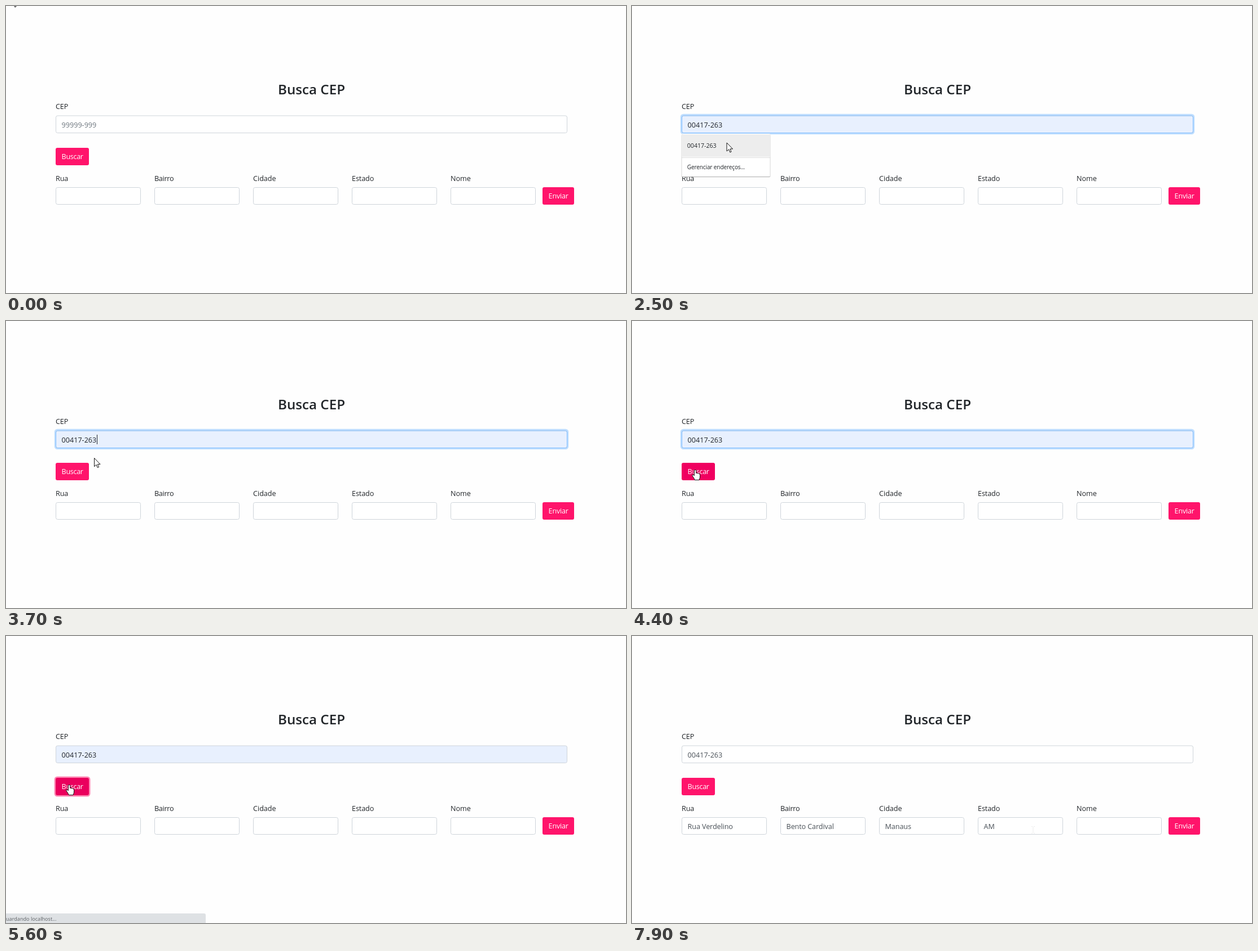
Animation of 1099x510 px, one loop 8000 ms. Source, as an HTML page:

```html
<!DOCTYPE html>
<html lang="pt-BR">
<head>
<meta charset="utf-8">
<title>Busca CEP</title>
<style>
html, body { margin: 0; width: 100%; height: 100%; overflow: hidden; background: #fefefe; }
svg { display: block; width: 100%; height: 100%; }
text { font-family: "Open Sans", "Noto Sans", sans-serif; font-size: 12.6px; fill: #212529; white-space: pre; }
.field { fill: #fff; stroke: #ced4da; }
.value { fill: #495057; }
.onBtn { fill: #fff; }
</style>
</head>
<body>
<svg id="stage" viewBox="0 0 1099 510" xmlns="http://www.w3.org/2000/svg"></svg>
<script>
const LOOP = 8000;
const CEP = "00417-263";
const PINK = "#ff146b", PINK_HOVER = "#f00060", PINK_ACTIVE = "#ea005d";
const stage = document.getElementById("stage");

function add(tag, attrs, parent = stage) {
  const node = document.createElementNS("http://www.w3.org/2000/svg", tag);
  for (const key in attrs) node.setAttribute(key, attrs[key]);
  parent.appendChild(node);
  return node;
}
function label(str, x, y, attrs = {}, parent = stage) {
  const node = add("text", { x, y, ...attrs }, parent);
  node.textContent = str;
  return node;
}
const box = (x, y, width, height, attrs, parent) =>
  add("rect", { x, y, width, height, rx: 3, ...attrs }, parent);
const spacing = v => ({ "letter-spacing": v });
const sized = px => "font-size:" + px + "px;";
const show = (node, on) => node.setAttribute("opacity", Number(on));
const clamp = v => Math.max(0, Math.min(1, v));
const mix = (a, b, p) => a + (b - a) * p;
const smooth = p => p * p * (3 - 2 * p);

// Heading and search field
label("Busca CEP", 541.5, 156.5, { "text-anchor": "middle", style: sized(24.2) + "font-weight:600" });
label("CEP", 88, 183, spacing(-0.1));
const focusRing = box(87.2, 193.2, 908.6, 33.6, { fill: "none", stroke: "#bfdeff", "stroke-width": 3, rx: 4 });
const cepField = box(88.5, 195, 906, 30.5, { class: "field" });
const focusLine = box(88.5, 195, 906, 30.5, { fill: "none", stroke: "#80bdff" });
const cepText = label(CEP, 98.6, 215.6);
const caret = add("rect", { y: 202, width: 1, height: 17, fill: "#212529" });

// Search button
const btnRing = box(87, 251, 61, 33, { fill: "none", stroke: "#ff8ab5", "stroke-width": 3, rx: 4 });
const searchBtn = box(88, 252, 59, 31, {});
label("Buscar", 98.6, 272, { class: "onBtn", ...spacing(-0.33) });

// Address row
const columns = [
  ["Rua", -0.1, "Rua Verdelino"],
  ["Bairro", -0.3, "Bento Cardival"],
  ["Cidade", 0, "Manaus"],
  ["Estado", -0.1, "AM"],
  ["Nome", 0, ""]
];
const results = columns.map(([name, gap, value], i) => {
  const x = 88 + i * 175;
  label(name, x, 310.8, spacing(gap));
  box(x + 0.5, 322.5, 150, 30, { class: "field" });
  return label(value, x + 10.6, 343, { class: "value", ...spacing(-0.1) });
});
box(951, 322, 56, 31, { fill: PINK });
label("Enviar", 961.6, 342.2, { class: "onBtn", ...spacing(-0.22) });

// Autofill list
const popup = add("g", {});
box(87, 228, 159, 76.5, { fill: "#000", opacity: 0.08 }, popup);
box(88, 229, 157, 75, { fill: "#b4b4b4", rx: 2 }, popup);
box(88, 227, 157, 76, { fill: "#fff", rx: 2 }, popup);
add("path", { d: "M88.5 227V302M244.5 227V302", stroke: "#ebebeb" }, popup);
const hoverRow = add("rect", { x: 88, y: 228, width: 157, height: 40, fill: "#ededed" }, popup);
add("path", { d: "M88 269.5H245", stroke: "#dcdcdc" }, popup);
label(CEP, 97.8, 251.6, { style: sized(10.6) + "font-weight:500" }, popup);
label("Gerenciar endereços...", 97.8, 290, { style: sized(10), ...spacing(-0.1) }, popup);

// Browser status bar
const status = add("g", {});
add("path", { d: "M0 493H351Q354 493 354 496V510H0Z", fill: "#dee1e4" }, status);
label("uardando localhost...", 0, 506, { style: sized(9.15) + "fill:#5c6064" }, status);

// Pointers
const outline = { fill: "#fff", stroke: "#111", "stroke-linejoin": "round" };
const beam = add("path", { d: "M708 338.5H710M712 338.5H714M708 350.5H710M712 350.5H714M711 339V350", stroke: "#ececec", fill: "none" });
const arrow = add("path", { d: "M0 0V15L3.5 11.8 5.8 17 8 16 5.8 11H10.5Z", ...outline });
const hand = add("path", {
  d: "M-1.7 1.5Q0-.8 1.7 1.5V6.5Q3.2 5 4.2 6.8 6 5.8 6.7 7.6 8.6 7.2 8.6 9.5V13Q8.6 15 7 18.5H-.8Q-1.5 16-4.6 11.8-6 9.6-4.4 9-3 8.6-1.7 10.8Z",
  ...outline
});

const inside = ([x, y], l, t, r, b) => x >= l && x <= r && y >= t && y <= b;

function pointerAt(t) {
  if (t < 3700) {
    if (t >= 800) return [168, 243];
    const p = clamp((t - 200) / 500);
    return [mix(10, 177, p), mix(-15, 168, p)];
  }
  if (t < 7000) {
    const p = smooth(clamp((t - 3600) / 800)), q = 1 - p;
    const bend = (a, b, c) => q * q * a + 2 * q * p * b + p * p * c;
    return [bend(168, 30, 112), bend(243, 250, 264)];
  }
  const p = smooth(clamp((t - 6900) / 900));
  return [mix(112, 607, p), mix(264, 343, p)];
}

function render(ms) {
  const t = Math.floor(ms % LOOP / 100) * 100;
  const during = (a, b) => t >= a && t < b;
  const preview = during(2300, 3000) || during(3200, 3700);
  const filled = during(3700, 6600);
  const loaded = t >= 6600;

  const focus = clamp((t - 1600) / 100) * clamp((4700 - t) / 200);
  show(focusRing, focus);
  show(focusLine, focus);
  cepField.style.fill = preview || filled ? "#e8f0fe" : "#fff";
  cepText.textContent = preview || filled || loaded ? CEP : "99999-999";
  cepText.style.fill = preview || filled ? "#212529" : loaded ? "#495057" : "#6c757d";

  // The caret blinks every half second while the field has focus
  show(caret, during(1700, 4600) && Math.floor((t - 1700) / 500) % 2 === 0);
  caret.setAttribute("x", filled ? 161 : 99);

  show(popup, during(1600, 3700));
  show(hoverRow, preview);
  show(status, during(4700, 7000));
  results.forEach(node => show(node, loaded));

  const pos = pointerAt(t);
  const onButton = inside(pos, 88, 252, 147, 283) && t >= 3700;
  const overField = inside(pos, 88, 195, 995, 226) ||
    columns.some((c, i) => inside(pos, 88 + i * 175, 322, 239 + i * 175, 353));
  const hidden = during(800, 2300) || during(3000, 3200) || t >= 7900 || overField;
  const place = "translate(" + pos + ")";
  arrow.setAttribute("transform", place);
  hand.setAttribute("transform", place);
  show(arrow, !hidden && !onButton);
  show(hand, onButton);
  show(beam, t >= 7900);

  show(btnRing, loaded ? 0 : clamp((t - 4500) / 200));
  const hover = onButton && !during(6600, 7000);
  searchBtn.setAttribute("fill", during(4600, 6600) ? PINK_ACTIVE : hover ? PINK_HOVER : PINK);
}

function tick(now) {
  render(now);
  requestAnimationFrame(tick);
}
render(0);
requestAnimationFrame(tick);
</script>
</body>
</html>
```
